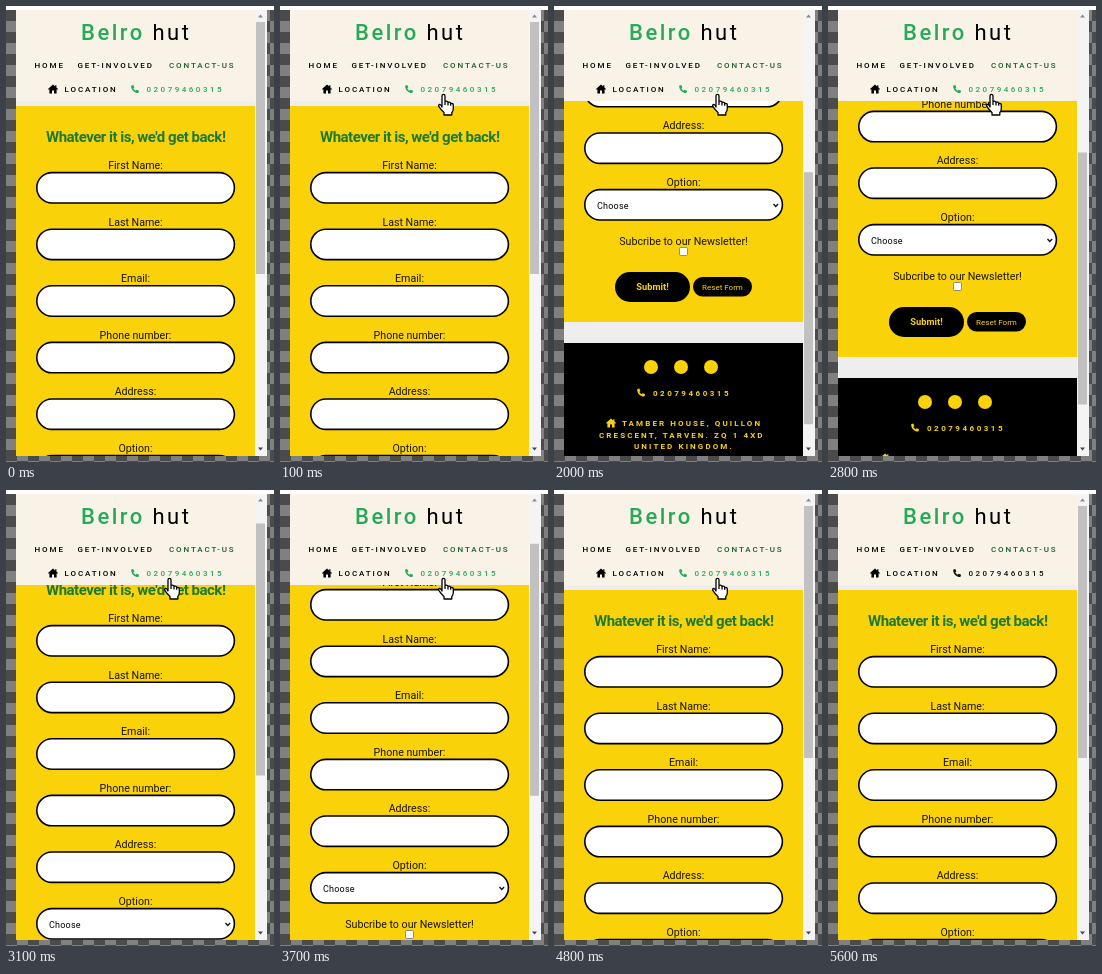
An HTML page that plays this animation: 268 px wide and 456 px high, repeating every 5.9 s.

```html
<!DOCTYPE html>
<html lang="en">
<head>
<meta charset="utf-8">
<title>Contact form scroll</title>
<style>
@property --scroll { syntax: "<number>"; inherits: true; initial-value: 0; }

html, body { margin: 0; width: 100%; height: 100%; overflow: hidden; background: #fff; }

svg {
  display: block; width: 268px; height: 456px;
  font-family: Roboto, sans-serif;
  animation: wheel 5900ms step-end infinite;
}

.page { transform: translateY(calc(var(--scroll) * -1px)); }
.thumb { transform: translateY(calc(var(--scroll) * .565px)); }
.phone { fill: #27a95a; animation: unhover 5900ms linear infinite; }
.cursor { animation: pointer 5900ms step-end infinite; }

/* One wheel notch moves the page by about 67px. */
@keyframes wheel {
  0% { --scroll: 0; }
  27.1% { --scroll: 67; }
  28.8% { --scroll: 133; }
  30.49% { --scroll: 200; }
  33.88% { --scroll: 266; }
  35.58% { --scroll: 298; }
  47.44% { --scroll: 231; }
  49.14% { --scroll: 164; }
  50.83% { --scroll: 98; }
  52.53% { --scroll: 31; }
  54.22% { --scroll: 0; }
  62.7% { --scroll: 67; }
  64.39% { --scroll: 133; }
  66.09% { --scroll: 266; }
  67.78% { --scroll: 298; }
  76.26% { --scroll: 231; }
  77.95% { --scroll: 98; }
  79.65% { --scroll: 31; }
  81.34%, 100% { --scroll: 0; }
}
@keyframes unhover {
  0%, 87.2% { fill: #27a95a; }
  91.5%, 100% { fill: #111; }
}
@keyframes pointer {
  0% { opacity: 0; }
  1.68% { opacity: 1; }
  88.12%, 100% { opacity: 0; }
}

.brand { font-size: 22px; letter-spacing: 2.5px; }
.nav { font-size: 8px; font-weight: 500; letter-spacing: 1.9px; }
.digits { letter-spacing: 2.5px; }
.heading { font-size: 15px; font-weight: 700; letter-spacing: -.5px; fill: #1d7a35; }
.label { font-size: 10.67px; text-anchor: middle; fill: #1a1503; }
.button { font-size: 8px; text-anchor: middle; fill: #f9d20a; }
.submit { font-size: 9.3px; font-weight: 700; }
.footer { font-size: 8px; font-weight: 700; letter-spacing: 2.1px; fill: #f9d20a; }
.field { fill: #fff; stroke: #000; stroke-width: 1.6; }
</style>
</head>
<body>
<svg viewBox="0 0 268 456">
  <defs>
    <pattern id="checker" width="22" height="22" patternUnits="userSpaceOnUse" y="4">
      <path d="M0 0h22v22H0z" fill="#808080"/>
      <path d="M0 0h11v11H0zM11 11h11v11H11z" fill="#4b4b4b"/>
    </pattern>
    <clipPath id="view"><path d="M10 4h239v446H10z"/></clipPath>
    <path id="house" d="M5 0 0 4.6 .7 5.3 1.4 4.7V9H4V6H6V9H8.6V4.7L9.3 5.3 10 4.6 8.4 3.1V.8H7.2V2z"/>
    <path id="handset" d="M.4 .6 2.3 0 3.4 2.5 2.3 3.5Q3.1 5.1 4.6 5.8L5.6 4.7 8.1 5.8 7.5 7.8Q6.8 8.3 5.6 7.9 .9 6.5 .2 2.1 .1 1.2 .4 .6z"/>
  </defs>

  <path d="M0 4h268v452H0z" fill="url(#checker)"/>
  <path d="M10 4h251v446H10z" fill="#eee"/>

  <g clip-path="url(#view)">
    <g class="page">
      <path d="M10 100h239v482H10z" fill="#f9d20a"/>
      <text class="heading" x="40" y="136">Whatever it is, we'd get back!</text>
      <g id="fields"></g>

      <text x="43" y="468.5" font-size="9" letter-spacing=".2">Choose</text>
      <path d="m219.5 464 2.3 2.4 2.3-2.4" fill="none" stroke="#111" stroke-width="1.4"/>
      <text class="label" x="129.5" y="504.5">Subcribe to our Newsletter!</text>
      <rect x="125.5" y="507.5" width="8" height="8" rx="1.2" fill="#fff" stroke="#777" stroke-width=".8"/>

      <rect x="61" y="532" width="75" height="30" rx="15"/>
      <text class="button submit" x="98.5" y="550">Submit!</text>
      <rect x="139" y="537" width="59" height="19.5" rx="9.75"/>
      <text class="button" x="168.5" y="549.7">Reset Form</text>

      <path d="M10 603h239v160H10z"/>
      <g class="footer">
        <circle cx="97" cy="627" r="7"/>
        <circle cx="127" cy="627" r="7"/>
        <circle cx="157" cy="627" r="7"/>
        <use href="#handset" x="83" y="648.5"/>
        <text class="digits" x="99" y="656">02079460315</text>
        <use href="#house" x="52" y="678.5"/>
        <text x="68" y="686.3">TAMBER HOUSE, QUILLON</text>
        <text x="45" y="697.8">CRESCENT, TARVEN. ZQ 1 4XD</text>
        <text x="80" y="709.3">UNITED KINGDOM.</text>
      </g>
    </g>
  </g>

  <path d="M10 4h239v91H10z" fill="#f8f3e6"/>
  <text class="brand" x="75" y="33.5"><tspan fill="#27a95a" font-weight="500">Belro</tspan><tspan x="146.5">hut</tspan></text>
  <g class="nav">
    <text x="28.5" y="61.5">HOME</text>
    <text x="71.5" y="61.5">GET-INVOLVED</text>
    <text x="163" y="61.5" fill="#1d5b2c">CONTACT-US</text>
    <use href="#house" x="42" y="78.5"/>
    <text x="58.5" y="86.2">LOCATION</text>
    <g class="phone">
      <use href="#handset" x="125" y="79"/>
      <text class="digits" x="140.5" y="86.2">02079460315</text>
    </g>
  </g>

  <path d="M249 4h12v446h-12z" fill="#f4f4f4"/>
  <path class="thumb" d="M250 16h9v252h-9z" fill="#c1c1c1"/>
  <path d="m252 11.5 2.5-3 2.5 3z" fill="#888"/>
  <path d="m252 441.5 2.5 3 2.5-3z" fill="#444"/>

  <path class="cursor" fill="#fff" stroke="#000" stroke-width="1.3" stroke-linejoin="round"
    d="M162 101V90Q162 88.4 163.5 88.4T165 90V95.5Q167.5 94.6 168 96.4 170.2 95.6 170.7 97.4 173.3 97 173.3 99.2V102.5Q173.3 105 171.8 106.5V109H164V106.5Q161.5 104.5 158.8 100.4 158.2 98.8 159.6 98.4 160.8 98.4 162 101zM165 95.5V99M168 96.4V99.4M170.7 97.4V99.8"/>
</svg>

<script>
const labels = ["First Name:", "Last Name:", "Email:", "Phone number:", "Address:", "Option:"];
const pitch = 56.6;

document.getElementById("fields").innerHTML = labels.map((label, i) => {
  const y = i * pitch;
  return `<text class="label" x="129.5" y="${163 + y}">${label}</text>
    <rect class="field" x="30.8" y="${166.6 + y}" width="197.6" height="30.4" rx="15.2"/>`;
}).join("");
</script>
</body>
</html>
```
